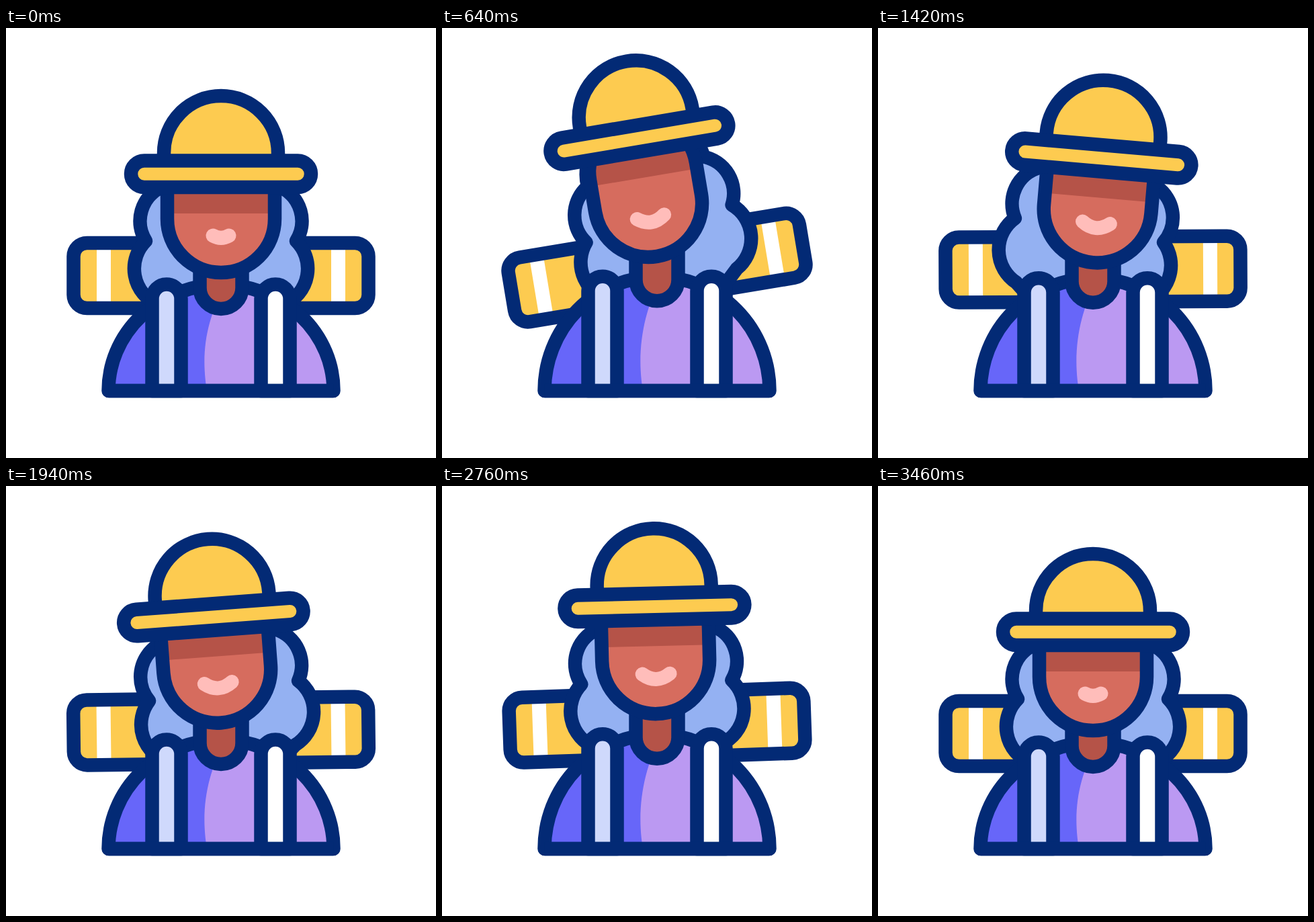
An HTML page for the animation above (3600 ms loop, 640 by 640 pixels).

```html
<!DOCTYPE html>
<html lang="en">
<head>
<meta charset="utf-8">
<title>Hiker</title>
<style>
  html, body { margin: 0; width: 100%; height: 100%; overflow: hidden; background: #fff; }
  svg { display: block; width: 100vw; height: 100vh; }
  .line { stroke: #032a75; stroke-width: 20.5; stroke-linejoin: round; }
</style>
</head>
<body>
<svg viewBox="0 0 640 640">
  <defs>
    <clipPath id="faceClip">
      <path d="M240 236A80 80 0 0 1 400 236V284A80 80 0 0 1 240 284Z"/>
    </clipPath>
    <clipPath id="bodyClip"><path id="bodyShape"/></clipPath>
  </defs>

  <g id="pack">
    <rect x="100.5" y="320" width="439" height="97" rx="20" fill="#fdcb50"/>
    <path d="M135 325H156V412H135ZM484 325H505V412H484Z" fill="#fff"/>
    <rect class="line" x="100.5" y="320" width="439" height="97" rx="20" fill="none"/>
  </g>

  <g id="hair">
    <path class="line" fill="#94b1f2" d="M231 237A89 80 0 0 1 409 237
      A56 56 0 0 1 432 317A58 58 0 0 1 415 411L385 435H255L225 411
      A58 58 0 0 1 208 317A56 56 0 0 1 231 237Z"/>
  </g>

  <path id="bodyFill" fill="#bb99f2"/>
  <path id="bodyShade" fill="#6766f9" clip-path="url(#bodyClip)"/>
  <path id="bodyLine" class="line" fill="none"/>
  <path id="neck" class="line" fill="#b55348"/>
  <path id="strapL" class="line" fill="#cfd9fc"/>
  <path id="strapR" class="line" fill="#fff"/>
  <path class="line" d="M152.500 540H487.500"/>

  <g id="head">
    <g clip-path="url(#faceClip)">
      <rect x="230" y="140" width="180" height="230" fill="#d66c5e"/>
      <rect id="shadow" x="220" y="120" width="200" height="156" fill="#b55348"/>
    </g>
    <path id="mouth" fill="none" stroke="#ffbdba" stroke-width="21" stroke-linecap="round"/>
    <path class="line" fill="none" d="M240 236A80 80 0 0 1 400 236V284A80 80 0 0 1 240 284Z"/>
    <g id="hat" fill="#fdcb50">
      <path class="line" d="M235 217V186A85 85 0 0 1 405 186V217Z"/>
      <rect class="line" x="186" y="197.500" width="268" height="39.500" rx="19.750"/>
    </g>
  </g>
</svg>

<script>
const LOOP = 3600, BEAT = 540;
const SWING = [0, -10, 8, -6, 4, -2, 0];
const el = id => document.getElementById(id);
const set = (id, name, value) => el(id).setAttribute(name, value);
const clamp = v => Math.min(1, Math.max(0, v));
const ease = u => (1 - Math.cos(Math.PI * clamp(u))) / 2;
const firmEase = u => u * u / (u * u + (1 - u) * (1 - u));

// Side-to-side sway in degrees, dying out over six beats.
function swing(t, delay) {
  const u = (t - delay) / BEAT;
  if (u <= 0 || u >= 6) return 0;
  const k = Math.floor(u);
  return SWING[k] + (SWING[k + 1] - SWING[k]) * ease(u - k);
}

// Three up-and-down steps, each two beats long.
function hop(t, delay, heights, curve = ease) {
  const u = (t - delay) / (2 * BEAT);
  if (u <= 0 || u >= 3) return 0;
  const step = Math.floor(u);
  return heights[step] * curve(1 - Math.abs(1 - 2 * (u - step)));
}

function strap(x, dy) {
  return `M${x - 21.5} 540V${403 - dy}a21.500 21.500 0 0 1 43 0V540Z`;
}

function draw(t) {
  const rise = hop(t, 0, [12.5, 12.5, 12.5], firmEase);
  const headRise = hop(t, 38, [25, 25, 25]);
  const lift = hop(t, 80, [31, 19, 13]);
  const tilt = swing(t, 174);
  const hairTilt = swing(t, 255) * 0.6;
  const smile = ease(t / BEAT) - ease((t - 2920) / BEAT);

  set('pack', 'transform', `translate(0 ${-rise}) rotate(${swing(t, 40)} 320 368.5)`);

  const body = `M152.500 540A167.500 ${158 + rise} 0 0 1 487.500 540Z`;
  for (const id of ['bodyShape', 'bodyFill', 'bodyLine']) set(id, 'd', body);
  set('bodyShade', 'd',
    `M326 ${385 - rise}C300 ${430 - rise * 0.7} 289 480 299 540H140V${375 - rise}H326Z`);
  set('neck', 'd', `M288.500 ${345 - rise}V${386.5 - rise}a31.500 31.500 0 0 0 63 0V${345 - rise}Z`);
  set('strapL', 'd', strap(239, rise));
  set('strapR', 'd', strap(401, rise));

  const pose = `translate(0 ${-headRise}) rotate(${tilt} 320 362)`;
  set('head', 'transform', pose);
  set('hair', 'transform', `${pose} rotate(${hairTilt} 320 190)`);

  const drift = -lift * tilt * Math.PI / 180 * 0.6;
  const hatMove = `translate(${drift} ${-lift})`;
  set('hat', 'transform', hatMove);
  set('shadow', 'transform', hatMove);

  const half = 12 + 8.5 * smile, end = 309 - 4.5 * smile;
  set('mouth', 'd', `M${320 - half} ${end}Q320 ${624.6 - end} ${320 + half} ${end}`);
}

const start = performance.now();
function tick(now) {
  draw(Math.max(0, now - start) % LOOP);
  requestAnimationFrame(tick);
}
draw(0);
requestAnimationFrame(tick);
</script>
</body>
</html>
```
